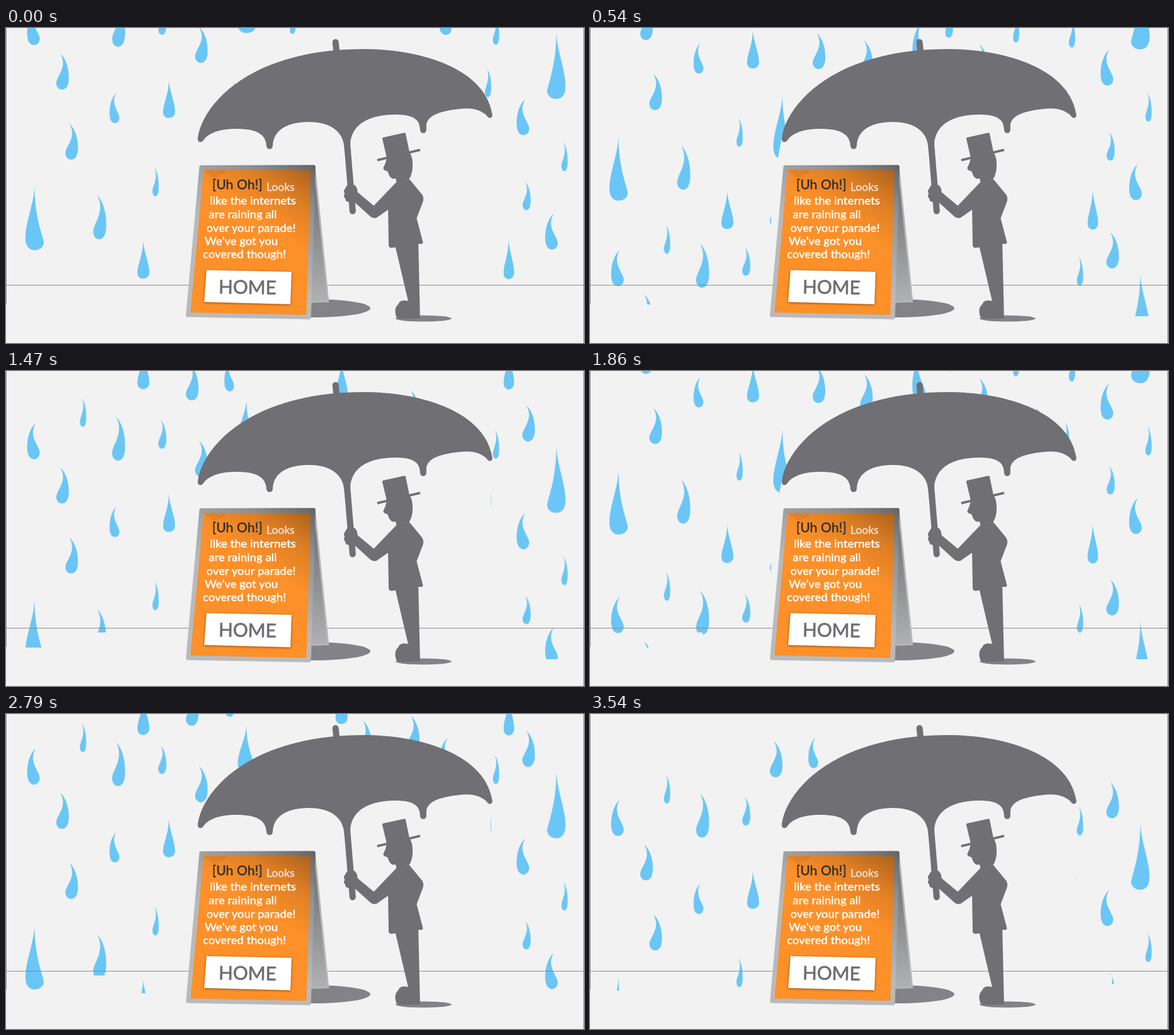
Write an HTML page without scripts that moves like this. It is 1012 px wide and 553 px high and loops after 3.57 s.

```html
<!DOCTYPE html>
<html lang="en">
<head>
<meta charset="utf-8">
<title>Rain on the parade</title>
<style>
  html, body { margin: 0; width: 100%; height: 100%; overflow: hidden; background: #f2f2f2; }
  svg { display: block; width: 100%; height: 100%; }
  #rain { fill: #69c6f6; animation: fall 3570ms steps(119, end) infinite; }
  @keyframes fall { to { transform: translateY(2796.5px); } }
  .ink { fill: #706f73; }
  .rod { stroke: #706f73; stroke-linecap: round; fill: none; }
  .edge { stroke: #858585; fill: none; }
  .copy { font: 20px Lato, "Open Sans", sans-serif; letter-spacing: .2px; fill: #fff; stroke: #fff; stroke-width: .55px; }
  .copy .loud { font-size: 23px; fill: #2f2d2d; stroke: #2f2d2d; }
  .copy .dim { font-size: 19px; fill: #f3e0d2; stroke: #f3e0d2; }
  .home { font: 33px Lato, "Open Sans", sans-serif; fill: #6f6e72; stroke: #6f6e72; stroke-width: .8px; }
  .button { fill: #fff; filter: drop-shadow(0 1px 2px rgba(70, 30, 0, .6)); }
</style>
</head>
<body>
<svg viewBox="0 0 1012 553" preserveAspectRatio="none">
  <defs>
    <!-- drops hang from their tip at 0,0 -->
    <path id="big" d="M0 0C0 50 12 80 16 97C17 106 9 112 0 112S-16 105-16 92C-16 62-2 35 0 0Z"/>
    <path id="mid" d="M0 0C2 21 11 40 11 55C11 62 6 66 0 66S-10 62-10 55C-10 42 0 24 0 0Z"/>
    <path id="curl" d="M0 0C9 8 15 23 15 42C15 55 11 63 3 63C-3 63-7 58-7 52C-7 40 14 24 0 0Z"/>
    <use id="tall" href="#curl" transform="scale(1.04 1.22)"/>
    <use id="back" href="#curl" transform="scale(-1 1)"/>
    <use id="hook" href="#curl" transform="scale(-.78 .84)"/>
    <use id="thin" href="#curl" transform="scale(.5 .8)"/>
    <use id="slim" href="#curl" transform="scale(.64 .79)"/>

    <linearGradient id="frame" gradientUnits="userSpaceOnUse" x1="541" y1="241" x2="430" y2="400">
      <stop offset="0" stop-color="#646464"/>
      <stop offset=".35" stop-color="#8f9091"/>
      <stop offset="1" stop-color="#b9babb"/>
    </linearGradient>
    <linearGradient id="panel" gradientUnits="userSpaceOnUse" x1="534" y1="246" x2="464" y2="352">
      <stop offset="0" stop-color="#a9601d"/>
      <stop offset=".5" stop-color="#df7f24"/>
      <stop offset="1" stop-color="#fd9029"/>
    </linearGradient>
    <linearGradient id="rear" x1="0" y1="0" x2="0" y2="1">
      <stop offset="0" stop-color="#69696b"/>
      <stop offset="1" stop-color="#b0b1b2"/>
    </linearGradient>
    <clipPath id="ground">
      <path d="M0 0H1012V506H935V474H914V458H893V468H866V471H268V490H197V459H145V485.500H0Z"/>
    </clipPath>
  </defs>

  <rect width="1012" height="553" fill="#f2f2f2"/>

  <g clip-path="url(#ground)">
    <g id="rain">
      <g id="wave">
        <use href="#big" x="50" y="278"/>
        <use href="#big" x="337" y="205"/>
        <use href="#big" x="622" y="225"/>
        <use href="#big" transform="translate(963.500 8) scale(-1 1.04)"/>
        <use href="#big" transform="translate(421 -73) scale(.95 .73)"/>
        <use href="#mid" x="240" y="374"/>
        <use href="#mid" x="285" y="92"/>
        <use href="#mid" x="587" y="-142"/>
        <use href="#mid" x="813" y="322"/>
        <use href="#mid" transform="translate(880 372) scale(.88 1.04)"/>
        <use href="#curl" x="95" y="45"/>
        <use href="#curl" x="111" y="168"/>
        <use href="#curl" x="322" y="-136"/>
        <use href="#curl" x="338" y="-2"/>
        <use href="#curl" x="397" y="96"/>
        <use href="#curl" x="480" y="109"/>
        <use href="#curl" x="625" y="-82"/>
        <use href="#curl" x="682" y="116"/>
        <use href="#curl" x="709" y="-90"/>
        <use href="#curl" x="734" y="243"/>
        <use href="#curl" x="781" y="168"/>
        <use href="#curl" x="911" y="-64"/>
        <use href="#tall" x="160" y="294"/>
        <use href="#tall" x="193" y="-44"/>
        <use href="#tall" x="449" y="222"/>
        <use href="#tall" transform="translate(580 78) scale(-1 1)"/>
        <use href="#back" x="52" y="-33"/>
        <use href="#back" x="531" y="304"/>
        <use href="#back" x="773" y="-51"/>
        <use href="#back" x="909" y="125"/>
        <use href="#back" x="959" y="326"/>
        <use href="#hook" x="193" y="114"/>
        <use href="#hook" x="394" y="-142"/>
        <use href="#thin" x="133" y="-77"/>
        <use href="#thin" x="260" y="245"/>
        <use href="#thin" x="500" y="-40"/>
        <use href="#thin" x="531" y="188"/>
        <use href="#thin" x="744" y="62"/>
        <use href="#thin" x="832" y="193"/>
        <use href="#thin" x="842" y="71"/>
        <use href="#thin" x="856" y="-21"/>
        <use href="#thin" x="976" y="201"/>
        <use href="#slim" x="271" y="-38"/>
        <use href="#slim" x="626" y="54"/>
        <use href="#slim" x="909" y="270"/>
      </g>
      <use href="#wave" y="-510"/>
      <use href="#wave" y="-1027"/>
      <use href="#wave" y="-1560"/>
      <use href="#wave" y="-2092"/>
      <use href="#wave" y="-2589"/>
    </g>
  </g>

  <!-- dry ground under the umbrella -->
  <path fill="#f2f2f2" d="M336 190L500 110H780L848 154L850 340L840 386V520H296L317 345L319 275L327 240Z"/>
  <path class="edge" d="M0 451.500H1012M.5 0V484M1011.500 0V553"/>

  <!-- umbrella -->
  <path class="rod" stroke-width="11" d="M577 25L579 45M597 200L607 321.500"/>
  <path class="ink" d="M336 192C342 150 385 95 465 64C520 43 575 37 625 37C735 37 838 75 851 150
    Q853 156 848 158Q844 158 841 153C828 141 809 140 795 142C765 145 738 152 736 170V179A5.500 5.500 0 0 1 725 179
    C725 160 712 152 682 152C642 152 603 165 602.500 208L604 225L594 225L592 208C590 182 568 165 531 165C491 165 468 180 467 207
    A5.500 5.500 0 0 1 456 207C455 185 436 177 404 177C374 177 354 184 345 198Q341 202 337 199Q335 196 336 192Z"/>

  <!-- shadows -->
  <g fill="#838287">
    <ellipse cx="540" cy="492" rx="98" ry="16"/>
    <ellipse cx="731" cy="510" rx="49" ry="5.500"/>
  </g>

  <!-- man -->
  <g class="ink">
    <path d="M659 195Q658 193 661 192L697 184Q700 184 700 187L707 221L667 229Z"/>
    <path d="M667 227L664 238L660.500 246Q661 250 668 251.500L671 259Q676 267 682 264L684 271L706 265Q712 255 712 242C712 232 711 225 706 217Z"/>
    <path d="M684 270L644 312L614 287L606 302L638 331Q643 335 649 333L669 319L670 382Q671 386 675 386L682 385
      L704 479Q689 476 687 485Q680 490 682 502Q683 511 692 511L725 510L722 379L727 379Q730 379 730 376L719 334
      L730 305Q732 299 729 293L706 265Z"/>
    <path d="M600 275Q603 273 611 276Q617 283 615 291L608 304Q605 308 601 305Q594 306 594 299Q590 296 593 291Q590 285 594 282Q596 276 600 275Z"/>
  </g>
  <path class="rod" stroke-width="4" style="stroke-linecap:butt" d="M650 232L725 214"/>

  <!-- sign -->
  <path d="M541 246L565 480L534 482Z" fill="url(#rear)"/>
  <path d="M541 250L564 480L535 481" fill="none" stroke="#b5b6b8" stroke-width="3"/>
  <path d="M342 244.500L538.500 244L530.500 508L318.500 504Z" fill="url(#frame)" stroke="url(#frame)" stroke-width="7" stroke-linejoin="round"/>
  <path d="M346 249L533 249.500L526 503.500L323 499.500Z" fill="url(#panel)"/>
  <path d="M346 249L391 249.500L364 264Z" fill="#a9601d" opacity=".22"/>
  <g class="copy">
    <text class="loud" x="361" y="283">[Uh Oh!]</text>
    <text class="dim" x="456" y="286">Looks</text>
    <text x="357" y="310">like the internets</text>
    <text x="355" y="334">are raining all</text>
    <text x="351" y="358">over your parade!</text>
    <text x="348" y="381">We’ve got you</text>
    <text x="345" y="404">covered though!</text>
  </g>
  <path class="button" d="M351 425L500 428L498 485L347 481Z"/>
  <text class="home" transform="translate(372 466) rotate(.8)">HOME</text>
</svg>
</body>
</html>
```
